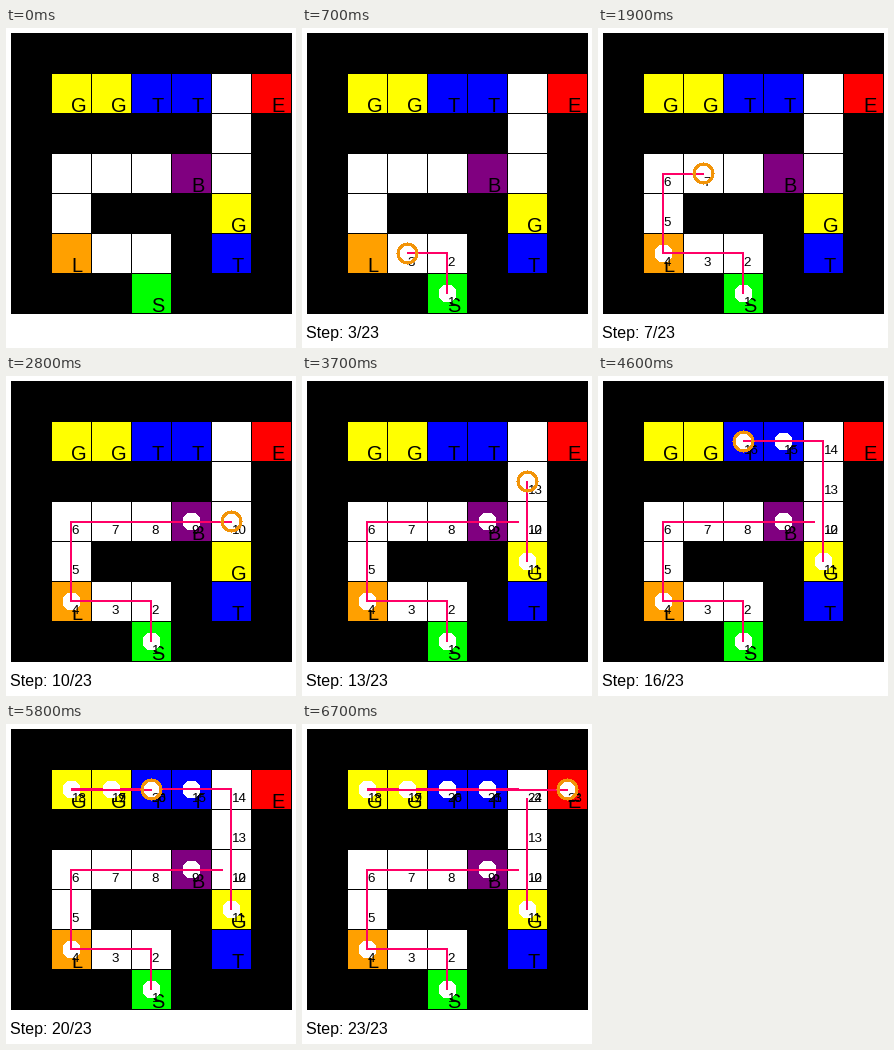
A matplotlib script for the animation above (7.9 s loop, 290 by 320 pixels).

```python
import matplotlib.pyplot as plt
from matplotlib.animation import FuncAnimation
from matplotlib.patches import Circle, Rectangle

W, H, DPI = 290, 320, 100
CELL, MARGIN = 40, 5
PINK, RING = "#ff0066", "#f29408"

MAZE = [
    "#######",
    "#GGTT.E",
    "#####.#",
    "#...B.#",
    "#.###G#",
    "#L..#T#",
    "###S###",
]
COLORS = {".": "white", "G": "#ffff00", "T": "#0000ff", "E": "#ff0000",
          "B": "#800080", "L": "#ffa000", "S": "#00ff00"}
START = (3, 6)
MOVES = "ULLUURRRRDUUULLLLRRRRR"
DIRS = {"U": (0, -1), "D": (0, 1), "L": (-1, 0), "R": (1, 0)}

plt.rcParams["font.family"] = "Liberation Sans"
fig = plt.figure(figsize=(W / DPI, H / DPI), dpi=DPI, facecolor="white")
ax = fig.add_axes([0, 0, 1, 1])
ax.set_xlim(0, W)
ax.set_ylim(H, 0)
ax.axis("off")


def box(x, y, w, h, color, z):
    return ax.add_patch(Rectangle((x, y), w, h, facecolor=color, linewidth=0,
                                  antialiased=False, zorder=z))


def label(x, y, text, px, z):
    return ax.text(x, y, text, fontsize=px * 72 / DPI, color="black",
                   ha="left", va="baseline", zorder=z)


def center(col, row):
    return (MARGIN + CELL * col + CELL // 2, MARGIN + CELL * row + CELL // 2)


def segment(a, b, z):
    """Two-pixel line; rightward runs sit one pixel lower than leftward ones."""
    (x0, y0), (x1, y1) = a, b
    if y0 == y1:
        top = y0 if x1 > x0 else y0 - 1
        return box(min(x0, x1), top, abs(x1 - x0) + 1, 2, PINK, z)
    return box(x0 - 1, min(y0, y1), 2, abs(y1 - y0) + 1, PINK, z)


def draw_maze():
    size = CELL * len(MAZE) + 1
    box(MARGIN, MARGIN, size, size, "black", 0)
    for row, line in enumerate(MAZE):
        for col, kind in enumerate(line):
            if kind == "#":
                continue
            box(MARGIN + CELL * col + 1, MARGIN + CELL * row + 1,
                CELL - 1, CELL - 1, COLORS[kind], 1)
            if kind != ".":
                cx, cy = center(col, row)
                label(cx, cy + 18.5, kind, 20, 2)


def walk():
    col, row = START
    points = [center(col, row)]
    for move in MOVES:
        dx, dy = DIRS[move]
        col, row = col + dx, row + dy
        points.append(center(col, row))
    return points


def draw_step(i):
    """Dot, line from the previous cell and number, stacked in visiting order."""
    cx, cy = path[i]
    z = 10 + 3 * i
    parts = [ax.add_patch(Circle((cx + 0.5, cy + 0.5), 8.5, facecolor="white",
                                 linewidth=0, antialiased=False, zorder=z))]
    if i:
        parts.append(segment(path[i - 1], path[i], z + 1))
    parts.append(label(cx + 0.6, cy + 13, str(i + 1), 13.33, z + 2))
    return parts


draw_maze()
path = walk()
total = len(path)
steps = [draw_step(i) for i in range(total)]
ring = ax.add_patch(Circle((0, 0), 9.5, fill=False, edgecolor=RING,
                           linewidth=2 * 72 / DPI, antialiased=False, zorder=200))
status = label(4.5, 310, "", 16, 200)


def update(frame):
    # one still frame, then a new step every 300 ms until the end is reached
    step = min(total, (frame + 2) // 3)
    for i, parts in enumerate(steps):
        for part in parts:
            part.set_visible(i < step)
    ring.set_visible(step > 0)
    status.set_text(f"Step: {step}/{total}" if step else "")
    if step:
        cx, cy = path[step - 1]
        ring.center = (cx + 0.5, cy + 0.5)
    return []


anim = FuncAnimation(fig, update, frames=79, interval=100, repeat=True,
                     repeat_delay=0, blit=False)
plt.show()
```
